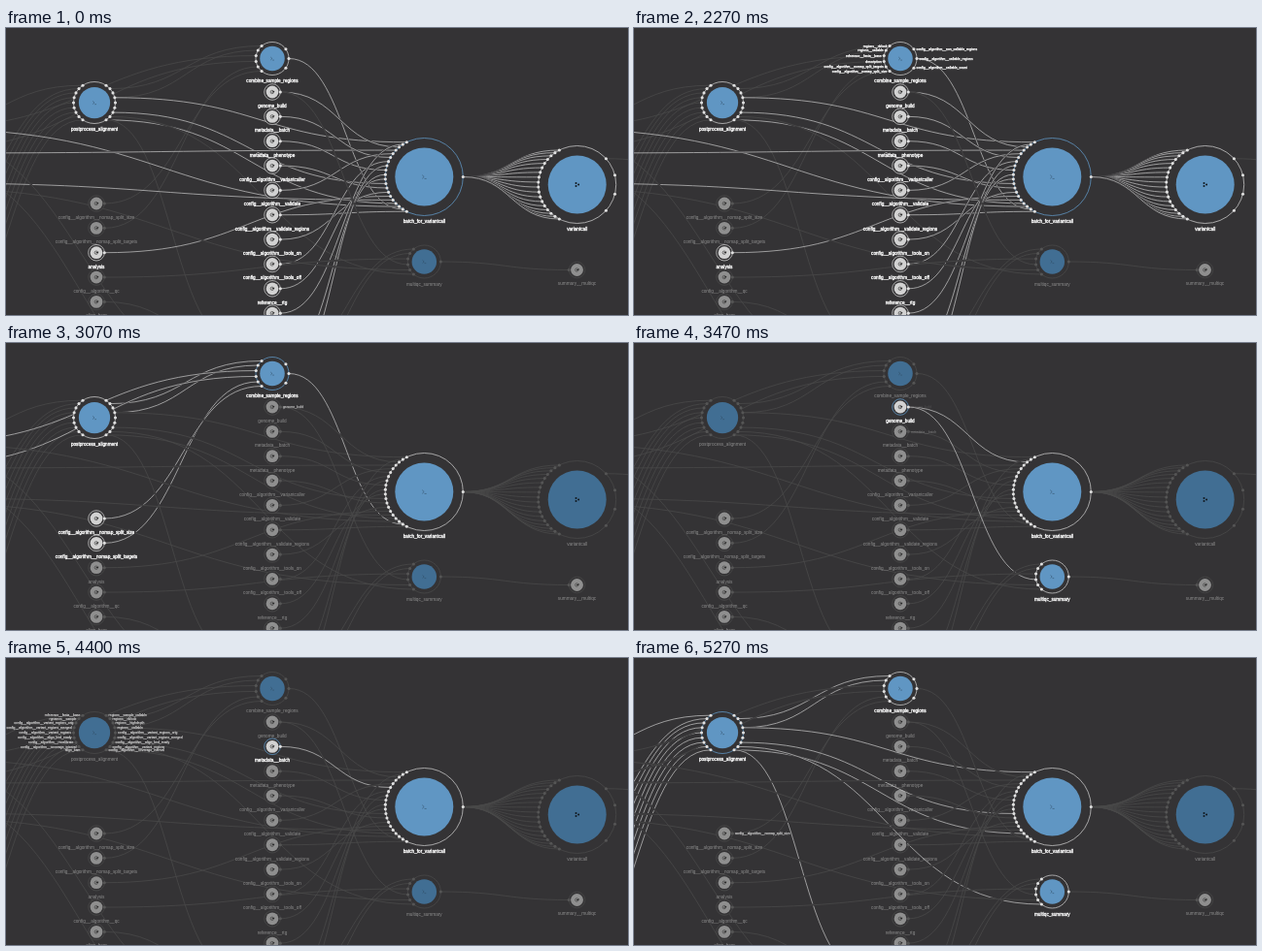
An HTML page with a canvas that plays this animation: 640x296 px, repeating every 5.34 s.

```html
<!DOCTYPE html>
<html lang="en">
<head>
<meta charset="utf-8">
<title>Workflow graph</title>
<style>
html, body { margin: 0; width: 100%; height: 100%; overflow: hidden; background: #343335; }
canvas { display: block; }
</style>
</head>
<body>
<canvas id="stage" width="640" height="296"></canvas>
<script>
const W = 640, H = 296, LOOP = 5340;
const BG = '#343335', BLUE = '#6096c3', DIM_BLUE = '#416e93';
const FONT = '"Liberation Sans", Arial, sans-serif';
const ctx = document.getElementById('stage').getContext('2d');
const layer = document.createElement('canvas');
layer.width = W;
layer.height = H;
const lctx = layer.getContext('2d');

// Nodes
const nodes = {};
function node(id, label, x, y, r, ins, outs, kind) {
  nodes[id] = { id, label, x, y, r, ins, outs, kind };
}
const alg = 'config__algorithm__';
node('post', 'postprocess_alignment', 91, 77, 21.5, 9, 9, 'tool');
node('combine', 'combine_sample_regions', 274, 31.5, 17, 6, 3, 'tool');
node('batch', 'batch_for_variantcall', 430.3, 153.5, 40, 20, 1, 'tool');
node('call', 'variantcall', 587.7, 161.5, 40, 18, 4, 'flow');
node('multiqc', 'multiqc_summary', 430.3, 241, 17, 6, 1, 'tool');
node('summary', 'summary__multiqc', 587.5, 249.5, 8.3, 1, 0, 'file');

function column(x, y, list) {
  list.forEach(([id, label], i) => node(id, label, x, y + 25.35 * i, 8.3, 0, 1, 'file'));
}
column(274, 66, [
  ['genome', 'genome_build'], ['mbatch', 'metadata__batch'], ['pheno', 'metadata__phenotype'],
  ['caller', alg + 'variantcaller'], ['valid', alg + 'validate'], ['vregions', alg + 'validate_regions'],
  ['on', alg + 'tools_on'], ['off', alg + 'tools_off'], ['rtg', 'reference__rtg'], ['snpeff', 'reference__snpeff']
]);
column(93, 181, [
  ['size', alg + 'nomap_split_size'], ['targets', alg + 'nomap_split_targets'],
  ['analysis', 'analysis'], ['qc', alg + 'qc'], ['bam', 'align_bam']
]);

// Ports are spread over an arc of 140 degrees on each side
function port(n, side, i) {
  const count = side < 0 ? n.ins : n.outs;
  const a = (140 * (i + 1) / (count + 1) - 70) * Math.PI / 180;
  return [n.x + side * n.r * Math.cos(a), n.y + n.r * Math.sin(a)];
}

// Edges: an end is [node id, port index] or a point off stage
const edges = [];
function edge(from, to) {
  const end = (e, side) => typeof e[0] === 'string' ? port(nodes[e[0]], side, e[1]) : e;
  const [x1, y1] = end(from, 1), [x2, y2] = end(to, -1);
  const mid = (x1 + x2) / 2;
  const path = new Path2D();
  path.moveTo(x1, y1);
  path.bezierCurveTo(mid, y1, mid, y2, x2, y2);
  edges.push({ a: from[0], b: to[0], path });
}
const left = y => [-82, y];

[[100, 0], [205, 1], [230, 2], [256, 3], [281, 4], [300, 5], [317, 6], [332, 7], [346, 8]]
  .forEach(([y, i]) => edge(left(y), ['post', i]));
edge(['post', 1], ['combine', 0]);
edge(['post', 3], ['combine', 1]);
edge(left(103), ['combine', 2]);
edge(left(126), ['combine', 3]);
edge(['targets', 0], ['combine', 4]);
edge(['size', 0], ['combine', 5]);
edge(['post', 3], ['batch', 0]);
edge(['post', 6], ['batch', 11]);
edge(['post', 8], ['batch', 16]);
edge(['post', 7], ['multiqc', 5]);
edge(['post', 8], [238, 325]);
edge(['combine', 1], ['batch', 18]);
edge(left(104), ['batch', 17]);
edge(left(129), ['batch', 3]);
edge(left(160), ['batch', 15]);
edge(['analysis', 0], ['batch', 14]);
Object.entries({
  genome: 2, mbatch: 5, pheno: 8, caller: 12, valid: 4,
  vregions: 19, on: 13, off: 6, rtg: 10, snpeff: 1
}).forEach(([id, i]) => edge([id, 0], ['batch', i]));
edge([282, 345], ['batch', 9]);
edge([282, 370], ['batch', 7]);
edge(['genome', 0], ['multiqc', 3]);
edge([282, 345], ['multiqc', 0]);
edge([282, 370], ['multiqc', 1]);
edge(['qc', 0], ['multiqc', 2]);
edge(left(165), ['multiqc', 4]);
edge(left(110), [240, 360]);
edge(left(140), [240, 410]);
edge(['bam', 0], [257, 340]);
for (let i = 0; i < nodes.call.ins; i++) edge(['batch', 0], ['call', i]);
edge(['multiqc', 0], ['summary', 0]);
edge(['call', 0], [720, 146]);

// Timeline: selected node, and port labels with fade-in and fade-out starts
const picks = [[0, 'batch'], [2330, 'combine'], [3200, 'genome'], [3800, 'mbatch'], [4670, 'post']];
const hovers = [
  { id: 'combine', on: 1940, off: 2670,
    ins: ['regions__nblock', 'regions__callable', 'reference__fasta__base', 'description',
      alg + 'nomap_split_targets', alg + 'nomap_split_size'],
    outs: [alg + 'non_callable_regions', alg + 'callable_regions', alg + 'callable_count'] },
  { id: 'genome', on: 2930, off: 3300, ins: [], outs: ['genome_build'] },
  { id: 'mbatch', on: 3400, off: 3850, ins: [], outs: ['metadata__batch'] },
  { id: 'post', on: 4200, off: 4800,
    ins: ['reference__fasta__base', 'rgnames__sample', alg + 'variant_regions_orig',
      alg + 'variant_regions_merged', alg + 'variant_regions', alg + 'align_bed_ready',
      alg + 'recalibrate', alg + 'coverage_interval', 'align_bam'],
    outs: ['regions__sample_callable', 'regions__nblock', 'regions__highdepth', 'regions__callable',
      alg + 'variant_regions_orig', alg + 'variant_regions_merged', alg + 'align_bed_ready',
      alg + 'variant_regions', alg + 'coverage_interval'] },
  { id: 'size', on: 5090, off: 9999, ins: [], outs: [alg + 'nomap_split_size'] }
];
const FADE = 200;
const ramp = (t, start) => {
  const p = Math.min(1, Math.max(0, (t - start) / FADE));
  return p * p * (3 - 2 * p);
};

// Drawing helpers
function disc(x, y, r, color) {
  ctx.fillStyle = color;
  ctx.beginPath();
  ctx.arc(x, y, r, 0, 7);
  ctx.fill();
}
function ring(x, y, r, color, width) {
  ctx.strokeStyle = color;
  ctx.lineWidth = width;
  ctx.beginPath();
  ctx.arc(x, y, r, 0, 7);
  ctx.stroke();
}
function line(color, width, ...pts) {
  ctx.strokeStyle = color;
  ctx.lineWidth = width;
  ctx.beginPath();
  pts.forEach(([x, y]) => ctx.lineTo(x, y));
  ctx.stroke();
}
function text(str, x, y, size, align, color, heavy) {
  ctx.font = size + 'px ' + FONT;
  ctx.textAlign = align;
  ctx.textBaseline = 'middle';
  ctx.fillStyle = ctx.strokeStyle = color;
  ctx.fillText(str, x, y);
  if (heavy) {
    ctx.lineWidth = heavy;
    ctx.strokeText(str, x, y);
  }
}

function icon(n) {
  const { x, y, r, kind } = n;
  if (kind === 'tool') {
    const s = 0.9 + r * 0.01;
    line('#2f4a62', 0.55, [x - 1.6 * s, y - 1.4 * s], [x - 0.1 * s, y], [x - 1.6 * s, y + 1.4 * s]);
    line('#2f4a62', 0.55, [x + 0.2 * s, y + 1.5 * s], [x + 1.8 * s, y + 1.5 * s]);
  } else if (kind === 'flow') {
    [[-1.2, -1.4], [1.4, 0.1], [-1.2, 1.6]].forEach(([dx, dy]) => disc(x + dx, y + dy, 1, '#10161c'));
  } else {
    ring(x - 0.2, y, 1.7, '#444', 0.7);
    line('#222', 1, [x - 0.4, y + 0.2], [x + 2.2, y - 0.6]);
  }
}

function drawNode(n, lit, selected) {
  const { x, y, r, kind } = n;
  const file = kind === 'file';
  disc(x, y, r, BG);
  ring(x, y, r, selected ? BLUE : lit ? '#c4c4c4' : '#4a4a4a', 0.8);
  if (file) disc(x, y, 6.4, lit ? '#d2d2d2' : '#8f8f8f');
  else disc(x, y, r * 0.75, lit ? BLUE : DIM_BLUE);
  icon(n);
  for (const side of [-1, 1]) {
    const count = side < 0 ? n.ins : n.outs;
    for (let i = 0; i < count; i++) {
      const [px, py] = port(n, side, i);
      disc(px, py, 1.55, lit ? '#e0e0e0' : '#555');
    }
  }
  text(n.label, x, y + r + 6.4, 4.7, 'center', lit ? '#fff' : '#8e8e8e', lit ? 0.3 : 0);
}

function drawLabels(h, t, lit) {
  const alpha = ramp(t, h.on) * (1 - ramp(t, h.off));
  if (!alpha) return;
  const n = nodes[h.id];
  ctx.globalAlpha = alpha * (lit ? 1 : 0.55);
  [[h.ins, -1, 'right'], [h.outs, 1, 'left']].forEach(([list, side, align]) => {
    list.forEach((str, i) => {
      const [x, y] = port(n, side, i);
      text(str, x + side * 2.6, y + 0.3, 3.4, align, '#fff', 0.25);
    });
  });
  ctx.globalAlpha = 1;
}

// Lit edges on their own layer, so that every later edge cuts a gap in them
function drawLitEdges(isLit) {
  lctx.clearRect(0, 0, W, H);
  lctx.strokeStyle = '#c0c0c0';
  for (const e of edges) {
    lctx.globalCompositeOperation = 'destination-out';
    lctx.lineWidth = 2;
    lctx.stroke(e.path);
    if (isLit(e)) {
      lctx.globalCompositeOperation = 'source-over';
      lctx.lineWidth = 0.75;
      lctx.stroke(e.path);
    }
  }
  ctx.drawImage(layer, 0, 0);
}

function draw(t) {
  const pick = picks.filter(p => p[0] <= t).pop()[1];
  const isLit = e => e.a === pick || e.b === pick;
  const litNodes = new Set([pick]);
  edges.filter(isLit).forEach(e => litNodes.add(e.a).add(e.b));

  ctx.fillStyle = BG;
  ctx.fillRect(0, 0, W, H);
  ctx.strokeStyle = '#494949';
  ctx.lineWidth = 0.8;
  edges.forEach(e => isLit(e) || ctx.stroke(e.path));

  const all = Object.values(nodes);
  all.forEach(n => litNodes.has(n.id) || drawNode(n, false, false));
  drawLitEdges(isLit);
  all.forEach(n => litNodes.has(n.id) && drawNode(n, true, n.id === pick));
  hovers.forEach(h => drawLabels(h, t, litNodes.has(h.id)));
}

const start = performance.now();
function tick() {
  draw((performance.now() - start) % LOOP);
  requestAnimationFrame(tick);
}
tick();
</script>
</body>
</html>
```
